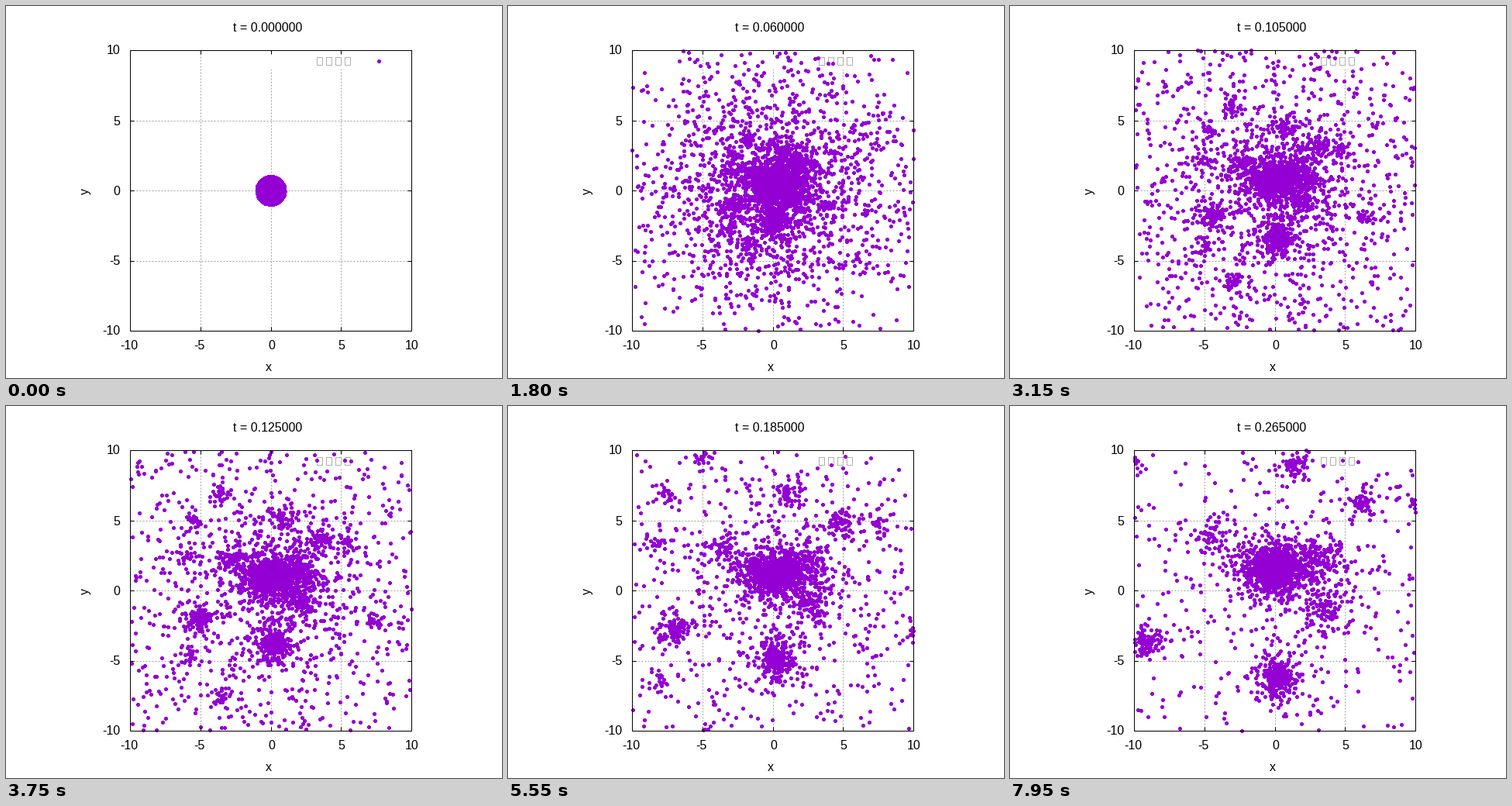
These frames come from a looping animation (640 px wide and 480 px high, 8 s). A matplotlib script:

```python
import numpy as np
import matplotlib.pyplot as plt
from matplotlib.animation import FuncAnimation
from matplotlib.patches import PathPatch
from matplotlib.path import Path

W, H, DPI = 640, 480, 100
PX = 72 / DPI
LEFT, RIGHT, TOP, BOTTOM = 160, 523, 57, 419
LOOP_MS, INTERVAL, HOLD = 8000, 50, 3
T_STEP, T_END = 0.005, 0.265
VIOLET = "#9400d3"
rng = np.random.default_rng(11)

plt.rcParams["font.family"] = "Liberation Sans"
plt.rcParams["font.size"] = 16 * PX


def polar(r, a):
    return np.column_stack([r * np.cos(a), r * np.sin(a)])


def angles(n):
    return rng.uniform(0, 2 * np.pi, n)


def disc(n):
    return polar(np.sqrt(rng.random(n)), angles(n))


class Clump:
    """A swarm that leaves the unit disc and orbits a moving centre."""

    def __init__(self, n, centre, power, spread, rate):
        self.centre, self.power = np.array(centre), power
        self.start = disc(n)
        self.spread = spread * np.exp(rng.normal(0, 0.4, (n, 1)))
        self.swing = rng.normal(size=(2, n, 2))
        self.rate = rate * rng.uniform(-1, 1, (n, 1))

    def at(self, t):
        progress, memory = t / T_END, np.exp(-t / 0.02)
        a, b = self.swing
        orbit = a * np.cos(self.rate * t) + b * np.sin(self.rate * t)
        orbit *= self.spread * (0.6 + 0.4 * progress)
        moved = self.centre * progress ** self.power + orbit
        return self.start * memory + moved * (1 - memory)


class Halo:
    """Free particles flying straight out of the unit disc."""

    def __init__(self, n, top_speed):
        self.start = disc(n)
        self.velocity = polar(top_speed * rng.beta(1.8, 3.1, n), angles(n))

    def at(self, t):
        return self.start + self.velocity * t


def fragment(n, x, y):
    # The farther a fragment gets, the less it is slowed and the tighter it is
    reach = np.hypot(x, y)
    return Clump(n, (x, y), reach / (reach + 3), 0.3 + 2.2 / reach, 9)


CORE = (0.13, 1.6)
swarms = [
    Halo(1900, 270),
    Clump(900, CORE, 0.7, np.array([0.78, 0.54]), 30),
    Clump(620, CORE, 0.7, np.array([1.65, 1.15]), 18),
    fragment(300, 0.25, -6.35),
    fragment(110, -9.1, -3.75),
    fragment(60, 6.2, 6.3),
    fragment(110, 3.4, -1.4),
    fragment(90, 3.5, 2.5),
    fragment(60, 1.4, 8.8),
    fragment(60, -4.5, 3.8),
]
for x, y in polar(rng.uniform(11, 18, 7), angles(7)):
    swarms.append(fragment(25, x, y))


def to_px(x, y):
    """Plot coordinates to pixel centres."""
    px = LEFT + (np.asarray(x) + 10) / 20 * (RIGHT - LEFT)
    py = BOTTOM - (np.asarray(y) + 10) / 20 * (BOTTOM - TOP)
    return np.floor(px + 0.5) + 0.5, np.floor(py + 0.5) + 0.5


DIAMOND = 2.5 * np.array([(1, 0), (0, 1), (-1, 0), (0, -1), (1, 0)])
DIAMOND_CODES = [Path.MOVETO] + [Path.LINETO] * 3 + [Path.CLOSEPOLY]


def diamonds(px, py):
    centres = np.column_stack([px, py])
    verts = (centres[:, None, :] + DIAMOND).reshape(-1, 2)
    return Path(verts, np.tile(DIAMOND_CODES, len(centres)))


fig = plt.figure(figsize=(W / DPI, H / DPI), dpi=DPI, facecolor="white")
ax = fig.add_axes([0, 0, 1, 1])
ax.set(xlim=(0, W), ylim=(H, 0))
ax.axis("off")


def line(xs, ys, color="black", z=5, **kw):
    ax.plot(xs, ys, color=color, lw=PX, snap=False, zorder=z,
            solid_capstyle="butt", dash_capstyle="butt",
            solid_joinstyle="miter", **kw)


def box(x0, y0, x1, y1, **kw):
    line([x0, x1, x1, x0, x0, x1], [y0, y0, y1, y1, y0, y0], **kw)


def label(x, y, text, ha="center", va="baseline", **kw):
    return ax.text(x, y, text, ha=ha, va=va, color="black", **kw)


def dots(px, py):
    return ax.add_patch(PathPatch(diamonds(px, py), fc=VIOLET, ec="none",
                                  lw=0, antialiased=False, snap=False,
                                  zorder=3))


x0, x1, y0, y1 = LEFT + 0.5, RIGHT + 0.5, TOP + 0.5, BOTTOM + 0.5
box(x0, y0, x1, y1)
grid = dict(color="#a0a0a0", z=1, linestyle=(0, (2, 2)))
for v in range(-10, 11, 5):
    gx, gy = to_px(v, v)
    if abs(v) < 10:
        # Grid lines stop below the key
        line([gx, gx], [y1, 82 if v >= 0 else y0], **grid)
        line([x0, x1], [gy, gy], **grid)
        for side in (0, 1):
            inward = 5 - 10 * side
            ex, ey = (x0, x1)[side], (y0, y1)[side]
            line([gx, gx], [ey, ey + inward])
            line([ex, ex + inward], [gy, gy])
    label(gx - 2 * (v < 0), 443, str(v))
    label(147.5, gy + 5, str(v), ha="right")

label(339, 471, "x")
label(102.5, 239, "y", rotation=90, va="center")
title = label(338, 33, "")

# Key entry: four empty glyph boxes and a sample point
for i in range(4):
    left = 401.5 + 12 * i
    box(left, 66.5, left + 7, 76.5, color="#b0b0b0", z=2)
sample = dots([481.5], [71.5])
cloud = dots([], [])


def update(frame):
    step = frame // HOLD
    t = step * T_STEP
    pos = np.vstack([swarm.at(t) for swarm in swarms])
    pos = pos[(np.abs(pos) <= 10).all(axis=1)]
    cloud.set_path(diamonds(*to_px(*pos.T)))
    sample.set_visible(step == 0)
    title.set_text(f"t = {t:.6f}")
    return cloud, sample, title


anim = FuncAnimation(fig, update, frames=LOOP_MS // INTERVAL,
                     interval=INTERVAL, repeat=True, repeat_delay=0)
plt.show()
```
